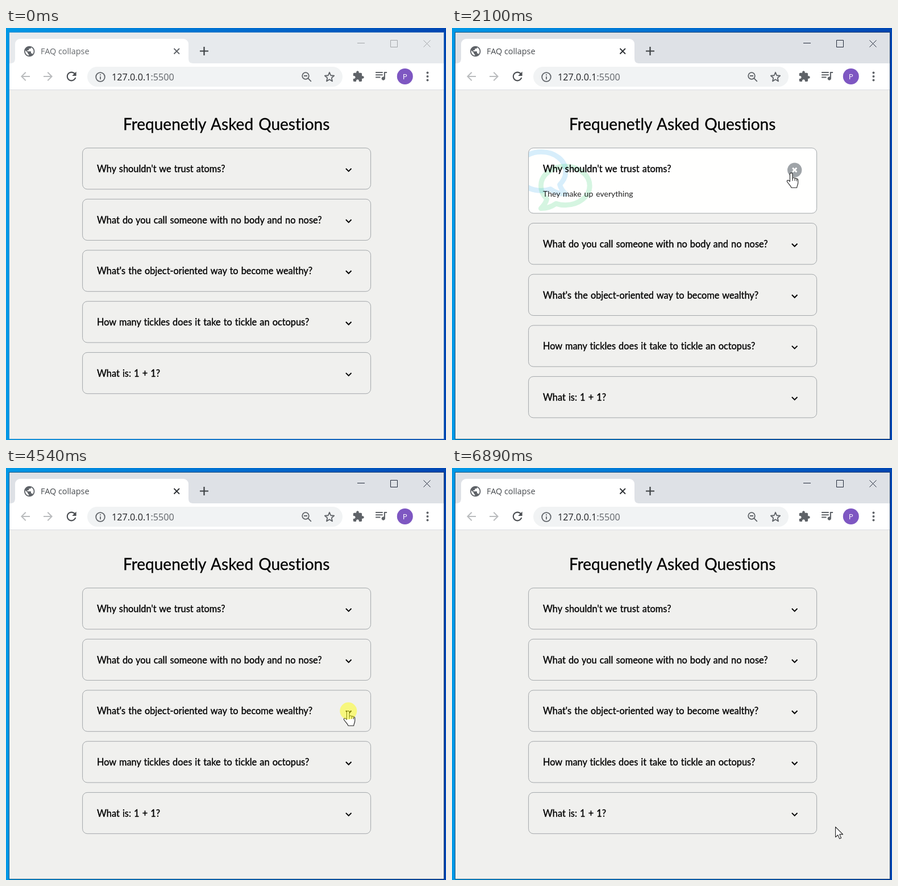
Write an HTML page that moves like this. It is 774 px wide and 723 px high and loops after 6940 ms.

```html
<!DOCTYPE html>
<html lang="en">
<head>
<meta charset="utf-8">
<title>FAQ collapse</title>
<style>
  html, body { margin: 0; width: 100%; height: 100%; overflow: hidden; background: #f0f0ee; }
  svg { display: block; width: 774px; height: 723px; }
  text { font-variant-ligatures: none; }
  .page { font-family: Lato, "Open Sans", sans-serif; fill: #000; }
  .heading { font-size: 28px; word-spacing: 2px; text-anchor: middle; stroke: #000; stroke-width: .3px; }
  .question { font-size: 16.35px; word-spacing: .9px; stroke: #000; stroke-width: .35px; }
  .answer { font-size: 14px; word-spacing: 1.4px; fill: #222; }
  .chrome { font-family: "Open Sans", "Noto Sans", sans-serif; }
  .line { fill: none; stroke: #5f6368; stroke-width: 1.8; }
  .icon { fill: #5f6368; }
  .off { fill: #babcbe; }
  .strip { fill: #e7eaed; }
  .edge { fill: none; stroke: #4f86b4; stroke-opacity: .5; }
  .control { fill: none; stroke: #a3a6a9; }
  .tab-title { font-size: 14.4px; fill: #63676b; }
  .active .strip { fill: #dee1e6; }
  .active .edge { stroke: #14283f; stroke-opacity: .6; }
  .active .control { stroke: #232a3a; }
  .active .tab-title { fill: #45494d; }
  .active .tab-close { stroke: #2c2f33; }
  .cursor path { fill: #fff; stroke: #222; stroke-width: 1.1; stroke-linejoin: round; }
  .cursor .creases { fill: none; }
</style>
</head>
<body>
<svg viewBox="0 0 774 723">
  <defs>
    <linearGradient id="sky">
      <stop offset="0" stop-color="#0098e6"/>
      <stop offset=".5" stop-color="#006fd0"/>
      <stop offset="1" stop-color="#0046b2"/>
    </linearGradient>
    <clipPath id="cardClip"><rect x="135" y=".5" width="506" height="113.4" rx="8"/></clipPath>
    <path id="bubble" d="M24 456C60 418 75 390 80 367C45 332 24 288 24 240A232 184 0 1 1 256 424C224 424 195 419 168 410C130 437 85 456 24 456Z"
      fill="none" stroke-width="48" stroke-linejoin="round"/>
  </defs>

  <rect width="774" height="723" fill="url(#sky)"/>

  <g id="win" class="chrome">
    <rect class="edge" x="5.5" y="7.5" width="765" height="714"/>
    <rect x="6" y="8" width="764" height="713" fill="#f0f0ee"/>
    <rect class="strip" x="6" y="8" width="764" height="55"/>
    <path d="M6 62C14 62 16 60 16 52V28a9 9 0 0 1 9-9H312a9 9 0 0 1 9 9V52c0 8 2 10 10 10Z" fill="#fff"/>
    <rect x="6" y="62" width="764" height="46" fill="#fff"/>
    <rect x="6" y="108" width="764" height="1" fill="#dadce0"/>

    <path class="icon" transform="translate(30.2 29.9) scale(.92)" d="M12 2C6.48 2 2 6.48 2 12s4.48 10 10 10 10-4.48 10-10S17.52 2 12 2zm-1 17.93c-3.95-.49-7-3.85-7-7.93 0-.62.08-1.21.21-1.79L9 15v1c0 1.1.9 2 2 2v1.93zm6.9-2.54c-.26-.81-1-1.39-1.9-1.39h-1v-3c0-.55-.45-1-1-1H8v-2h2c.55 0 1-.45 1-1V7h2c1.1 0 2-.9 2-2v-.41c2.93 1.19 5 4.06 5 7.41 0 2.08-.8 3.97-2.1 5.39z"/>
    <text class="tab-title" x="61" y="46">FAQ collapse</text>
    <path class="line tab-close" d="M295.5 36l9.5 9.5m0-9.5l-9.5 9.5"/>
    <path class="line" d="M341 40.5h15m-7.5-7.5v15" style="stroke:#3c4043;stroke-width:2.2"/>
    <path class="control" d="M618 26.5h13M676.5 21.5h12v12h-12zM734.5 21.5l12 12m0-12l-12 12"/>

    <path id="back" class="off" transform="translate(22 73)" d="M20 11H7.83l5.59-5.59L12 4l-8 8 8 8 1.41-1.41L7.83 13H20v-2z"/>
    <use href="#back" transform="matrix(-1 0 0 1 108 0)"/>
    <path class="icon" transform="translate(102.6 72.4) scale(1.05)" d="M17.65 6.35C16.2 4.9 14.21 4 12 4c-4.42 0-7.99 3.58-7.99 8s3.57 8 7.99 8c3.73 0 6.84-2.55 7.73-6h-2.08c-.82 2.33-3.04 4-5.65 4-3.31 0-6-2.69-6-6s2.69-6 6-6c1.66 0 3.14.69 4.22 1.78L13 11h7V4l-2.35 2.35z" style="fill:#4a4d51"/>
    <rect x="143" y="68" width="449" height="35" rx="17.5" fill="#f1f3f4"/>
    <circle class="line" cx="166" cy="86" r="7.8"/>
    <path class="line" d="M166 85v5.2M166 81.3v2"/>
    <text x="186" y="92" font-size="16.2" fill="#202124">127.0.0.1<tspan fill="#5f6368">:5500</tspan></text>
    <circle class="line" cx="527" cy="84" r="5.8"/>
    <path class="line" d="M531.2 88.2l5.6 5.6M524 84h6"/>
    <polygon id="star" class="line" stroke-linejoin="round"/>
    <path class="icon" transform="translate(609 74.3) scale(.9)" d="M20.5 11H19V7c0-1.1-.9-2-2-2h-4V3.5C13 2.12 11.88 1 10.5 1S8 2.12 8 3.5V5H4c-1.1 0-1.99.9-1.99 2v3.8H3.5c1.49 0 2.7 1.21 2.7 2.7s-1.21 2.7-2.7 2.7H2V20c0 1.1.9 2 2 2h3.8v-1.5c0-1.49 1.21-2.7 2.7-2.7 1.49 0 2.7 1.21 2.7 2.7V22H17c1.1 0 2-.9 2-2v-4h1.5c1.38 0 2.5-1.12 2.5-2.5S21.88 11 20.5 11z"/>
    <path class="icon" transform="translate(647 70.7) scale(1.05)" d="M15 6H3v2h12V6zm0 4H3v2h12v-2zM3 16h8v-2H3v2zM17 6v8.18c-.31-.11-.65-.18-1-.18-1.66 0-3 1.34-3 3s1.34 3 3 3 3-1.34 3-3V8h3V6h-5z"/>
    <circle cx="701.8" cy="85" r="14" fill="#7e57c2"/>
    <text x="701.8" y="90" font-size="13.5" fill="#fff" text-anchor="middle">P</text>
    <g class="icon"><circle cx="741.5" cy="78.5" r="2"/><circle cx="741.5" cy="85" r="2"/><circle cx="741.5" cy="91.5" r="2"/></g>
  </g>

  <g class="page">
    <text class="heading" x="387.7" y="179">Frequenetly Asked Questions</text>
    <g id="cards"></g>
  </g>

  <g id="cursor" class="cursor">
    <path id="arrow" d="M.6.8V18.8L4.8 15L7.7 21.6L10.6 20.3L7.8 13.9H13.6Z"/>
    <g id="hand" transform="translate(-.6 -.4) scale(.98)">
      <path d="M-2 16V2.6C-2 .2 2.6.2 2.6 2.6V10.5C3 8.8 6.6 9 6.9 10.8C7.6 9.7 10 10 10.3 12C11 11 12.6 11.6 12.6 13.5V18C12.6 22 10.5 24 10.5 27.2H.5C0 24-5 20-7 16.5C-8 14.5-5.5 13-4 14.3Z"/>
      <path class="creases" d="M2.6 10.5V15M6.9 11V15M10.3 12V15.5"/>
    </g>
  </g>
  <circle id="press" r="15" fill="#ff0" fill-opacity=".47"/>
</svg>

<script>
const LOOP = 6940;
const FADE = 300;
const FOCUS_AT = 1660;
const FIRST_TOP = 210.6, PITCH = 89.7;
const CLOSED = 72.3, OPENED = 114.5;
const TOGGLE = { x: 602.7, y: 38.6, r: 12.7 };

// open: [start, end] of the unfolded state
const faqs = [
  { q: "Why shouldn't we trust atoms?", a: "They make up everything", open: [1870, 3420] },
  { q: "What do you call someone with no body and no nose?" },
  { q: "What's the object-oriented way to become wealthy?", a: "Inheritance.", open: [4770, 6250] },
  { q: "How many tickles does it take to tickle an octopus?" },
  { q: "What is: 1 + 1?" },
];

const moves = [
  { start: 440, end: 1130, steps: 15, from: [681, 643], to: [592, 249], smooth: true },
  { start: 1180, end: 1410, steps: 6, from: [593, 250], to: [597, 254] },
  { start: 3560, end: 3850, steps: 7, from: [597, 256], to: [590, 300] },
  { start: 3900, end: 4110, steps: 5, from: [592, 325], to: [602, 421] },
  { start: 4160, end: 4260, steps: 3, from: [602, 423], to: [602, 426] },
  { start: 6810, end: 6890, steps: 3, from: [622, 482], to: [674, 629] },
];

const presses = [[1660, 1870], [3190, 3420], [4540, 4770], [6070, 6250]];

const $ = id => document.getElementById(id);
const within = (t, [a, b]) => t >= a && t < b;
const show = (el, on) => el.setAttribute("visibility", on ? "visible" : "hidden");
const shift = (el, x, y) => el.setAttribute("transform", `translate(${x} ${y})`);

// CSS "ease" curve
function ease(x) {
  if (x <= 0) return 0;
  if (x >= 1) return 1;
  const curve = (s, p, q) => 3 * p * s * (1 - s) ** 2 + 3 * q * s * s * (1 - s) + s ** 3;
  let lo = 0, hi = 1;
  for (let i = 0; i < 20; i++) {
    const mid = (lo + hi) / 2;
    if (curve(mid, .25, .25) < x) lo = mid; else hi = mid;
  }
  return curve(lo, .1, 1);
}

$("star").setAttribute("points", Array.from({ length: 10 }, (_, i) => {
  const r = i % 2 ? 3.9 : 8.6, a = i * Math.PI / 5;
  return `${569 + r * Math.sin(a)},${86.4 - r * Math.cos(a)}`;
}).join(" "));

const cards = faqs.map(faq => {
  const g = document.createElementNS("http://www.w3.org/2000/svg", "g");
  const { x, y, r } = TOGGLE;
  g.innerHTML = `
    <rect class="box" x="134.6" width="507" rx="8.5" fill="#fff" stroke="#a3a7aa"/>
    <g class="opened">
      <g clip-path="url(#cardClip)">
        <use href="#bubble" transform="translate(204.4 -3.6) scale(-.1848 .1848)" stroke="#3ba9f0" opacity=".2"/>
        <use href="#bubble" transform="translate(152 21.8) scale(.1848)" stroke="#2ecc71" opacity=".2"/>
      </g>
      <text class="answer" x="160" y="85.8">${faq.a || ""}</text>
      <circle cx="${x}" cy="${y}" r="${r}" fill="#9fa4a8"/>
      <path d="M${x - 3.6} ${y - 3.6}l7.2 7.2m0-7.2l-7.2 7.2" stroke="#fff" stroke-width="2.8"/>
    </g>
    <path class="closed" d="M${x - 4.8} ${y - 2.6}l4.8 4.8l4.8-4.8" fill="none" stroke="#000" stroke-width="2"/>
    <text class="question" x="160" y="42.4">${faq.q}</text>`;
  $("cards").append(g);
  const part = name => g.querySelector("." + name);
  return { g, faq, box: part("box"), opened: part("opened"), closed: part("closed") };
});

function drawCards(t) {
  let push = 0;
  return cards.map(({ g, faq, box, opened, closed }, i) => {
    const top = FIRST_TOP + PITCH * i + push;
    const open = !!faq.open && within(t, faq.open);
    const white = faq.open ? ease((t - faq.open[0]) / FADE) - ease((t - faq.open[1]) / FADE) : 0;
    shift(g, 0, top);
    box.setAttribute("height", open ? OPENED : CLOSED);
    box.setAttribute("fill-opacity", white);
    show(opened, open);
    show(closed, !open);
    if (open) push += OPENED - CLOSED;
    return top;
  });
}

function cursorAt(t) {
  const move = moves.filter(m => t >= m.start).pop();
  if (!move) return null;
  const { start, end, steps, from, to, smooth } = move;
  const last = steps - 1;
  let p = Math.min(last, Math.floor((t - start) / (end - start) * last + 1e-6)) / last;
  if (smooth) p = p * p * (3 - 2 * p);
  return from.map((v, i) => v + (to[i] - v) * p);
}

function drawCursor(t, tops) {
  const pos = cursorAt(t);
  $("cursor").style.display = pos ? "" : "none";
  show($("press"), presses.some(span => within(t, span)));
  if (!pos) return;
  const [x, y] = pos;
  const over = tops.some(top =>
    Math.abs(x - TOGGLE.x) <= TOGGLE.r && Math.abs(y - top - TOGGLE.y) <= TOGGLE.r);
  shift($("cursor"), x, y);
  shift($("press"), x + .3, y + .3);
  show($("hand"), over);
  show($("arrow"), !over);
}

function draw(t) {
  $("win").classList.toggle("active", t >= FOCUS_AT);
  drawCursor(t, drawCards(t));
}

const began = performance.now();
function tick() {
  draw((performance.now() - began) % LOOP);
  requestAnimationFrame(tick);
}
tick();
</script>
</body>
</html>
```
